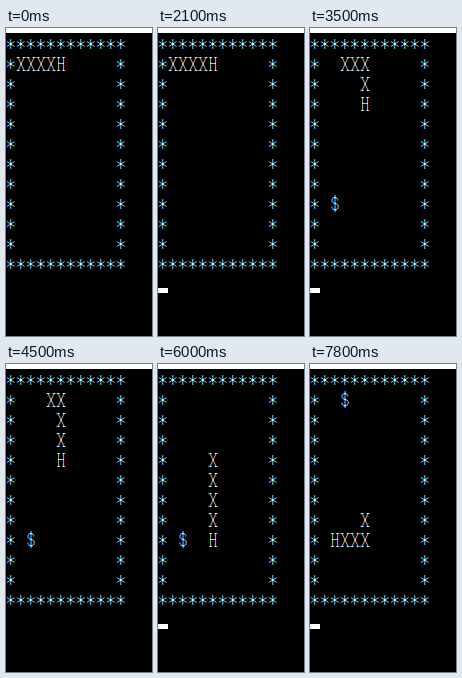
An HTML page with a canvas that plays this animation: 146x308 px, repeating every 8000 ms.

```html
<!DOCTYPE html>
<html lang="en">
<head>
<meta charset="utf-8">
<title>Console snake</title>
<style>
html, body { margin: 0; width: 100%; height: 100%; overflow: hidden; background: #000; }
canvas { display: block; }
</style>
</head>
<body>
<canvas id="stage" width="146" height="308"></canvas>
<script>
const ctx = document.getElementById('stage').getContext('2d');
const LOOP = 8000, CELL_W = 10, CELL_H = 20, TOP = 5;
const COLS = 12, ROWS = 12, LENGTH = 5;

// Thin line pieces, drawn inside one 10 x 20 cell.
const WARM = [200, 180, 168], BLUE = [150, 198, 222];
const PIECES = {
  '*': { rgb: BLUE, line: 'M4.7 6V16 M.8 8.5L8.6 13.5 M8.6 8.5L.8 13.5' },
  '$': { rgb: BLUE, line: 'M5 2V19 M8 7.5C7.5 3.5 2 3.5 2 7.5C2 11.5 8.3 9.5 8.3 13.5C8.3 18 2 18 1.7 13.5' },
  X: { rgb: WARM, line: 'M2 4.5L8 17.5 M8 4.5L2 17.5 M.5 4.5h3 M6.5 4.5h3 M.5 17.5h3 M6.5 17.5h3' },
  H: { rgb: WARM, line: 'M2.5 4.5V17.5 M7.5 4.5V17.5 M2.5 10.5H7.5 M1 4.5h3 M6 4.5h3 M1 17.5h3 M6 17.5h3' }
};
for (const piece of Object.values(PIECES)) piece.path = new Path2D(piece.line);

// The head goes right, then down, then left, one cell per move.
const path = [];
for (let c = 1; c <= 5; c++) path.push([c, 1]);
for (let r = 2; r <= 8; r++) path.push([5, r]);
for (let c = 4; c >= 2; c--) path.push([c, 8]);

const moves = [2800, 3500, 3900, 4600, 5000, 5400, 6000, 6700, 7200, 7800];

// What stands on the input line from each time on.
const prompts = [
  [0, ''], [1200, '_'], [1600, ''], [2100, '_'],
  [2400, 's'], [2800, '_'], [3300, 's'], [3400, ''], [3500, '_'],
  [3800, 's'], [3900, '_'], [4200, ''], [4300, 's'], [4500, ''], [4600, '_'],
  [4800, 's'], [5000, '_'], [5200, 's'], [5400, '_'], [5600, 's'], [6000, '_'],
  [6500, 'a'], [6700, '_'], [6900, 'a'], [7200, '_'],
  [7500, 'a'], [7700, ''], [7800, '_']
];

// Draws a piece one colour channel at a time, for subpixel fringes.
function put(name, col, row) {
  const { rgb, path } = PIECES[name];
  ctx.save();
  ctx.globalCompositeOperation = 'lighter';
  ctx.translate(col * CELL_W, TOP + row * CELL_H);
  ctx.translate(1 / 3, 0);
  rgb.forEach((value, i) => {
    const channel = [0, 0, 0];
    channel[i] = value;
    ctx.strokeStyle = `rgb(${channel})`;
    ctx.stroke(path);
    ctx.translate(-1 / 3, 0);
  });
  ctx.restore();
}

function box(color, x, y, w, h) {
  ctx.fillStyle = color;
  ctx.fillRect(x, y, w, h);
}

function drawWall() {
  for (let c = 0; c < COLS; c++) {
    put('*', c, 0);
    put('*', c, ROWS - 1);
  }
  for (let r = 1; r < ROWS - 1; r++) {
    put('*', 0, r);
    put('*', COLS - 1, r);
  }
}

function drawPrompt(state) {
  const y = TOP + ROWS * CELL_H;
  if (state === '_') {
    box('#fff', 0, y + 15, CELL_W, 5);
  } else if (state) {
    box('#000080', 0, y, CELL_W, CELL_H);
    ctx.font = "19px 'Liberation Serif', serif";
    ctx.fillStyle = '#c0c0d0';
    ctx.fillText(state, 0.5, y + 17);
    box('#fff', 9, y + 1, 1, CELL_H - 2);
  }
}

function draw(t) {
  box('#000', 0, 0, 146, 308);
  box('#fff', 0, 0, 146, TOP);
  drawWall();

  const step = moves.filter(at => at <= t).length;
  path.slice(step, step + LENGTH).forEach(([c, r], i) => put(i === LENGTH - 1 ? 'H' : 'X', c, r));
  if (step === moves.length) put('$', 3, 1);
  else if (step > 0) put('$', 2, 8);

  drawPrompt(prompts.filter(([at]) => at <= t).pop()[1]);
}

const start = performance.now();
function tick() {
  draw((performance.now() - start) % LOOP);
  requestAnimationFrame(tick);
}
draw(0);
requestAnimationFrame(tick);
</script>
</body>
</html>
```
